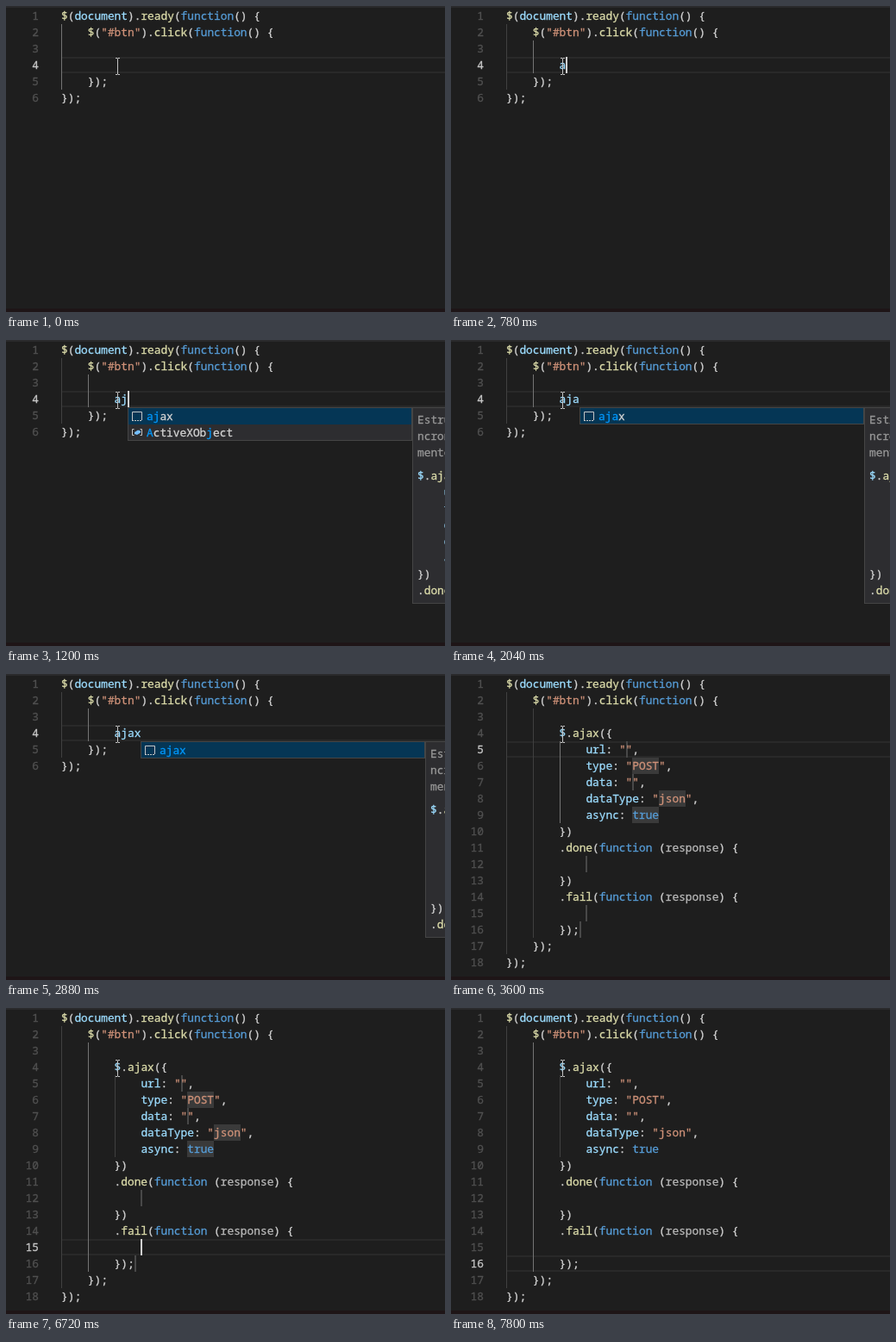
These frames come from a looping animation (509x355 px, 7980 ms). An HTML page:

```html
<!DOCTYPE html>
<html lang="en">
<head>
<meta charset="utf-8">
<title>Editor snippet</title>
<style>
  html, body { margin: 0; width: 100%; height: 100%; overflow: hidden; background: #1e1e1e; }
  #stage {
    position: relative; width: 509px; height: 355px; overflow: hidden;
    background: #1e1e1e; color: #d4d4d4;
    font: 12.83px/19px "Noto Sans Mono", "DejaVu Sans Mono", monospace;
    font-variant-ligatures: none; -webkit-text-stroke: .3px;
  }
  #stage div, #stage svg { position: absolute; box-sizing: border-box; }
  #view { left: 0; top: 0; width: 509px; height: 355px; white-space: pre; }
  .str { color: #ce9178; }
  .key { color: #569cd6; }
  .fn { color: #dcdcaa; }
  .id { color: #9cdcfe; }
  .unused { color: #b9b9b9; }
  .num { left: 0; width: 38px; text-align: right; color: #505050; }
  .num.on { color: #c6c6c6; }
  .current { left: 64px; width: 445px; height: 19px; border: solid #292929; border-width: 2px 0; }
  .guide { width: 1px; background: #404040; }
  .guide.on { background: #747474; }
  .slot { height: 19px; background: #3a3a3a; }
  .slot.empty { background: #484848; }
  .sel { height: 19px; background: #264f78; }
  .caret { width: 2px; height: 19px; background: #d0d0d0; }
  .list, .docs { top: 78px; background: #2d2d30; border: 1px solid #454545; overflow: hidden; }
  .list { width: 330px; }
  .docs { width: 200px; height: 228px; padding: 4px 5px; }
  .docs p { margin: 0 0 8px; color: #989898; }
  .row { left: 0; width: 100%; height: 19px; padding-left: 21px; }
  .row:first-child { background: #053655; }
  .row b { font-weight: 400; color: #0097fb; }
  .row svg { left: 3px; top: 2px; }
  .thumb { right: 0; top: 0; width: 10px; height: 27px; background: rgba(121,121,121,.4); }
  .edge { left: 0; width: 509px; }
</style>
</head>
<body>
<div id="stage">
  <div id="view"></div>
  <svg style="left:125px;top:59px" width="9" height="22" fill="none" stroke="#c4c4c4">
    <path d="M2 1.5h2l.5 1 .5-1h2M4.5 2v18M2 20.5h2l.5-1 .5 1h2"/>
  </svg>
  <div class="edge" style="top:0;height:2px;background:#2a2a2c"></div>
  <div class="edge" style="top:351px;height:4px;background:#1e1517"></div>
</div>
<script>
const LOOP = 7980, CH = 7.7, LH = 19, LEFT = 64, TOP = 2;
const view = document.getElementById('view');

const colX = c => Math.round(LEFT + c * CH);
const lineY = n => TOP + (n - 1) * LH;
const pad = n => ' '.repeat(n);

const ajaxCall = [
  '$.ajax({', '    url: "",', '    type: "POST",', '    data: "",',
  '    dataType: "json",', '    async: true', '})',
  '.done(function (response) {', '', '})',
  '.fail(function (response) {', '', '});'
];
const head = ['$(document).ready(function() {', '    $("#btn").click(function() {', ''];
const tail = ['    });', '});'];

// Tab stops: line, column, length
const slots = [[5, 18, 0], [6, 19, 4], [7, 19, 0], [8, 23, 4], [9, 19, 4],
               [12, 12, 0], [15, 12, 0], [16, 11, 0]];

const icons = {
  cube: '<path d="M7 1.5l5 2.6v5.8l-5 2.6-5-2.6V4.1zM2 4.1l5 2.6 5-2.6M7 6.7v5.8" stroke="#b180d7"/>',
  word: '<path d="M1 3.5h6M9 3.5h4M1 7.5h3M6 7.5h5M1 11.5h8M10 11.5h3" stroke="#c5c5c5" stroke-width="1.5"/>',
  value: '<path d="M3.5 3.5h-2v7h2M10.5 3.5h2v7h-2" stroke="#c5c5c5"/><path d="M4 7l4-2.5 3 1v2L7 10 4 9z" fill="#75beff"/>',
  snippet: '<path d="M1.5 12V2.5h11V12" stroke="#c5c5c5"/><path d="M1 12.5h12" stroke="#c5c5c5" stroke-dasharray="2 1"/>'
};
const words = [
  ['addEventListener', 'cube'], ['alert', 'cube'], ['any', 'word'],
  ['applicationCache', 'value'], ['arguments', 'value'], ['as', 'word'],
  ['atob', 'cube'], ['await', 'word'], ['ajax', 'snippet'],
  ['AbortController', 'value'], ['AbortSignal', 'value'], ['ActiveXObject', 'value']
];
const listenerDocs = ['function', 'bort" |', '"before', '"canpla', '| "cont', 'menu" |',
  '"device', '"drag" ', 'agleave', '"drop" ', '| "ende', 'hange" '].join('\n');
const snippetDocs = ['Estrutura', 'ncrona', 'mente'].join('\n');

// Each step changes only the named fields
const steps = [
  [0, { text: '', line: 4, col: 8, caret: 0, list: 0, docs: 0, sel: 0, bulb: 0, snippet: 0, unused: 0, slots: 0 }],
  [240, { caret: 1 }],
  [780, { text: 'a', col: 9 }],
  [840, { list: 1 }],
  [960, { docs: 1 }],
  [1200, { text: 'aj', col: 10 }],
  [1560, { text: 'aja', col: 11 }],
  [2040, { caret: 0 }],
  [2460, { text: 'ajax', col: 12, caret: 1 }],
  [2880, { caret: 0 }],
  [3120, { list: 0, docs: 0, snippet: 1, slots: 1, line: 5, col: 18, caret: 1 }],
  [3600, { caret: 0, unused: 1 }],
  [4080, { line: 6, col: 23, sel: 4, caret: 1 }],
  [4380, { bulb: 6 }],
  [4560, { line: 7, col: 19, sel: 0 }],
  [4860, { bulb: 0 }],
  [5100, { line: 8, col: 27, sel: 4 }],
  [5400, { bulb: 8 }],
  [5580, { line: 9, col: 23 }],
  [5820, { bulb: 9 }],
  [6060, { line: 12, col: 12, sel: 0 }],
  [6360, { bulb: 0 }],
  [6600, { line: 15 }],
  [7140, { caret: 0 }],
  [7320, { line: 16, col: 11, caret: 1, slots: 0 }],
  [7800, { caret: 0 }]
];
let last = {};
const states = steps.map(([at, change]) => ({ ...(last = { ...last, ...change }), at }));

const box = (cls, css, body = '') => `<div class="${cls}" style="${css}">${body}</div>`;
const at = (line, col) => `left:${colX(col)}px;top:${lineY(line)}px;`;

function paint(code, unused) {
  return code.replace(/"[^"]*"|\b(?:function|true)\b|[$\w]+/g, (word, i) => {
    const cls = word[0] === '"' ? 'str'
      : /^(function|true)$/.test(word) ? 'key'
      : word === 'response' && unused ? 'unused'
      : code[i + word.length] === '(' ? 'fn' : 'id';
    return `<span class="${cls}">${word}</span>`;
  });
}

function guide(col, from, to, on) {
  return box(on ? 'guide on' : 'guide',
    `${at(from, col)}height:${(to - from + 1) * LH}px`);
}

function guides(s) {
  if (!s.snippet) {
    return guide(0, 2, 5, !s.text) + (s.text ? guide(4, 3, 4, true) : '');
  }
  const inCall = s.line < 10;
  return guide(0, 2, 17) + guide(4, 3, 16, !inCall) + guide(8, 5, 9, inCall && !s.sel);
}

// Marks the typed letters in order; null when the word does not fit
function match(word, typed) {
  let k = 0;
  const html = [...word].map(c =>
    k < typed.length && c.toLowerCase() === typed[k] ? (k++, `<b>${c}</b>`) : c).join('');
  return k === typed.length ? html : null;
}

function suggestions(s) {
  const x = colX(s.col);
  const rows = words.map(([word, kind]) => [match(word, s.text), kind]).filter(r => r[0]);
  let html = rows.map(([word, kind], i) => box('row', `top:${i * LH}px`,
    `<svg width="14" height="14" fill="none">${icons[kind]}</svg>${word}`)).join('');
  if (rows.length > 11) html += box('thumb', '');
  html = box('list', `left:${x}px;height:${rows.length * LH + 1}px`, html);
  if (s.docs) {
    const body = s.text === 'a' ? listenerDocs
      : `<p>${snippetDocs}</p>${paint(ajaxCall.slice(0, 8).join('\n'))}`;
    html += box('docs', `left:${x + 330}px`, body);
  }
  return html;
}

function bulb(line) {
  return `<svg style="left:70px;top:${lineY(line) + 1}px" width="10" height="14">
    <path d="M5 0a4.5 4.5 0 0 0-3 7.8V9.5h6V7.8A4.5 4.5 0 0 0 5 0z" fill="#fc0"/>
    <path d="M2.5 11h5M3.5 13h3" stroke="#c5c5c5" stroke-width="1.3"/></svg>`;
}

function draw(s) {
  const body = s.snippet ? ajaxCall.map(l => pad(8) + l) : [pad(8) + s.text];
  const lines = [...head, ...body, ...tail];
  let html = s.sel ? '' : box('current', `top:${lineY(s.line)}px`);
  html += guides(s);
  if (s.slots) {
    html += slots.map(([line, col, len]) => box(len ? 'slot' : 'slot empty',
      `${at(line, col)}width:${len * CH || 2}px`)).join('');
  }
  if (s.sel) html += box('sel', `${at(s.line, s.col - s.sel)}width:${s.sel * CH}px`);
  lines.forEach((code, i) => {
    const n = i + 1;
    html += box(n === s.line ? 'num on' : 'num', `top:${lineY(n)}px`, n);
    html += box('', at(n, 0), paint(code, s.unused));
  });
  if (s.bulb) html += bulb(s.bulb);
  if (s.caret) html += box('caret', at(s.line, s.col));
  if (s.list) html += suggestions(s);
  view.innerHTML = html;
}

let shown;
function tick() {
  const t = performance.now() % LOOP;
  const state = states.findLast(s => s.at <= t);
  if (state !== shown) draw(shown = state);
  requestAnimationFrame(tick);
}
tick();
</script>
</body>
</html>
```
